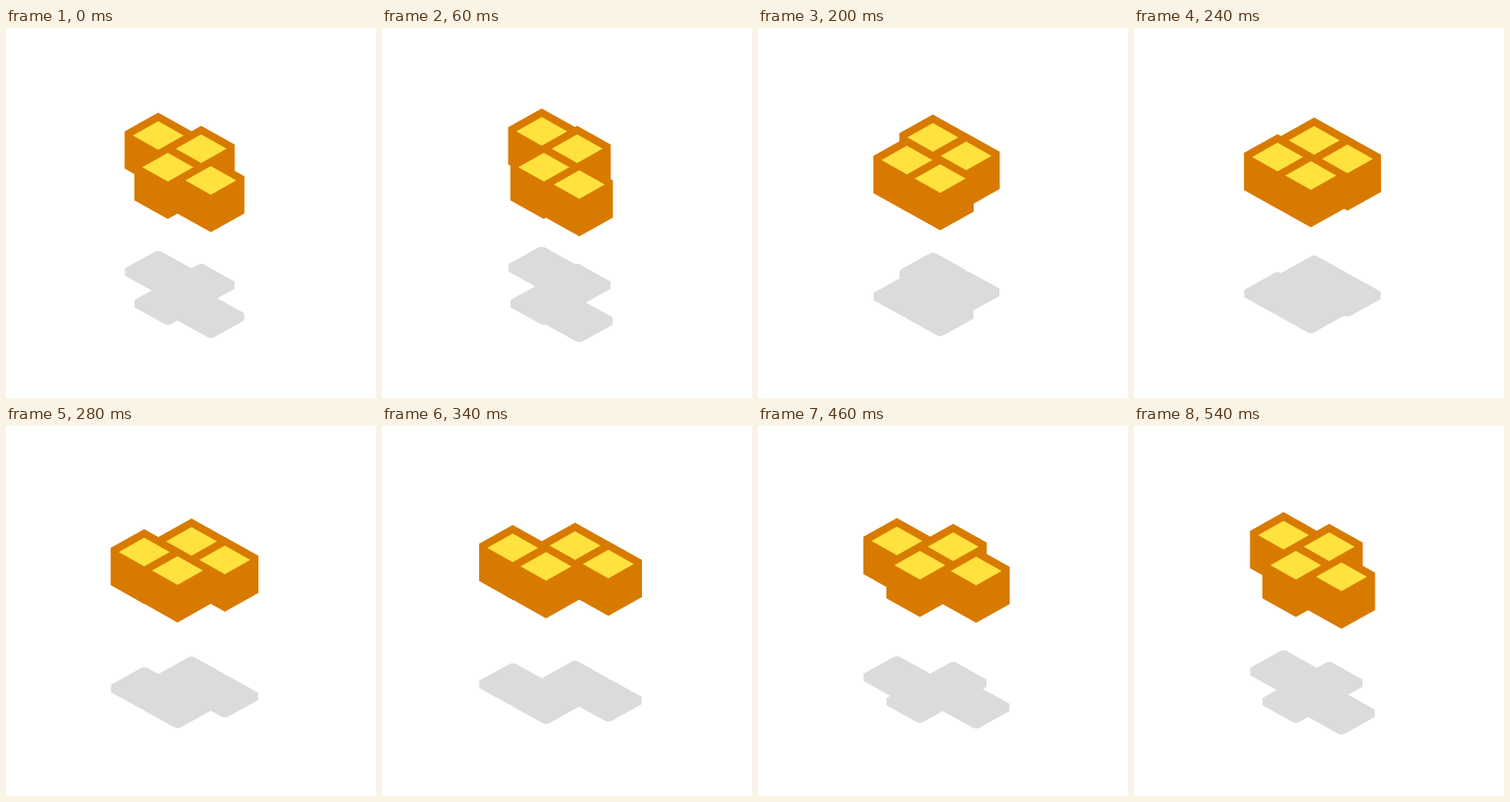
Write an HTML page with a canvas that moves like this. It is 400 by 400 pixels and loops after 0.56 s.

```html
<!DOCTYPE html>
<html>
<head>
<meta charset="utf-8">
<style>
  html, body { margin: 0; width: 100%; height: 100%; overflow: hidden; background: #fff; }
  canvas { display: block; }
</style>
</head>
<body>
<canvas id="stage" width="400" height="400"></canvas>
<script>
const ctx = document.getElementById('stage').getContext('2d');
const STEP = 20, HALF = 14, TURN = 6;
const W = 36, H = 20;

// Short hold, steady slide, soft stop
const ease = k => k < 2 ? 0 : Math.min(.07 + .08 * k, .7 + .3 * k / HALF);

// Outer boxes swap rows, then the two rows slide past each other
const swapRows = p => [[1, 0], [1, 1], [0, 1 - p], [2, p]];
const slideRows = p => [[p, 0], [1 + p, 0], [1 - p, 1], [2 - p, 1]];

function prism(path, x, y, w, h, height) {
  path.moveTo(x, y - h);
  path.lineTo(x + w, y);
  path.lineTo(x + w, y + height);
  path.lineTo(x, y + h + height);
  path.lineTo(x - w, y + height);
  path.lineTo(x - w, y);
  path.closePath();
}

// Flat tile with blunt sides and rounded tips
function shadow(path, x, y) {
  const cut = 4, tip = H + cut, edge = tip - cut * H / W;
  for (const s of [1, -1]) {
    path[s > 0 ? 'moveTo' : 'lineTo'](x - s * cut, y - s * edge);
    path.quadraticCurveTo(x, y - s * tip, x + s * cut, y - s * edge);
    path.lineTo(x + s * W, y - s * cut);
    path.lineTo(x + s * W, y + s * cut);
  }
  path.closePath();
}

function fill(path, color) {
  ctx.fillStyle = color;
  ctx.fill(path);
}

function draw() {
  const k = (Math.floor(performance.now() / STEP) + 2 * HALF - TURN) % (2 * HALF);
  const cells = (k < HALF ? slideRows : swapRows)(ease(k % HALF));
  const shadows = new Path2D(), bodies = new Path2D(), lids = new Path2D();

  for (const [col, row] of cells) {
    const x = 175 + W * (col - row), y = 106 + H * (col + row);
    shadow(shadows, x, y + 152);
    prism(bodies, x, y, W + .3, H + .3, 40.3);
    prism(lids, x, y + 4.5, 27.5, 15.5, 0);
  }

  ctx.clearRect(0, 0, 400, 400);
  fill(shadows, '#dbdbdb');
  fill(bodies, '#d87a00');
  fill(lids, '#ffe23d');
  requestAnimationFrame(draw);
}
draw();
</script>
</body>
</html>
```
